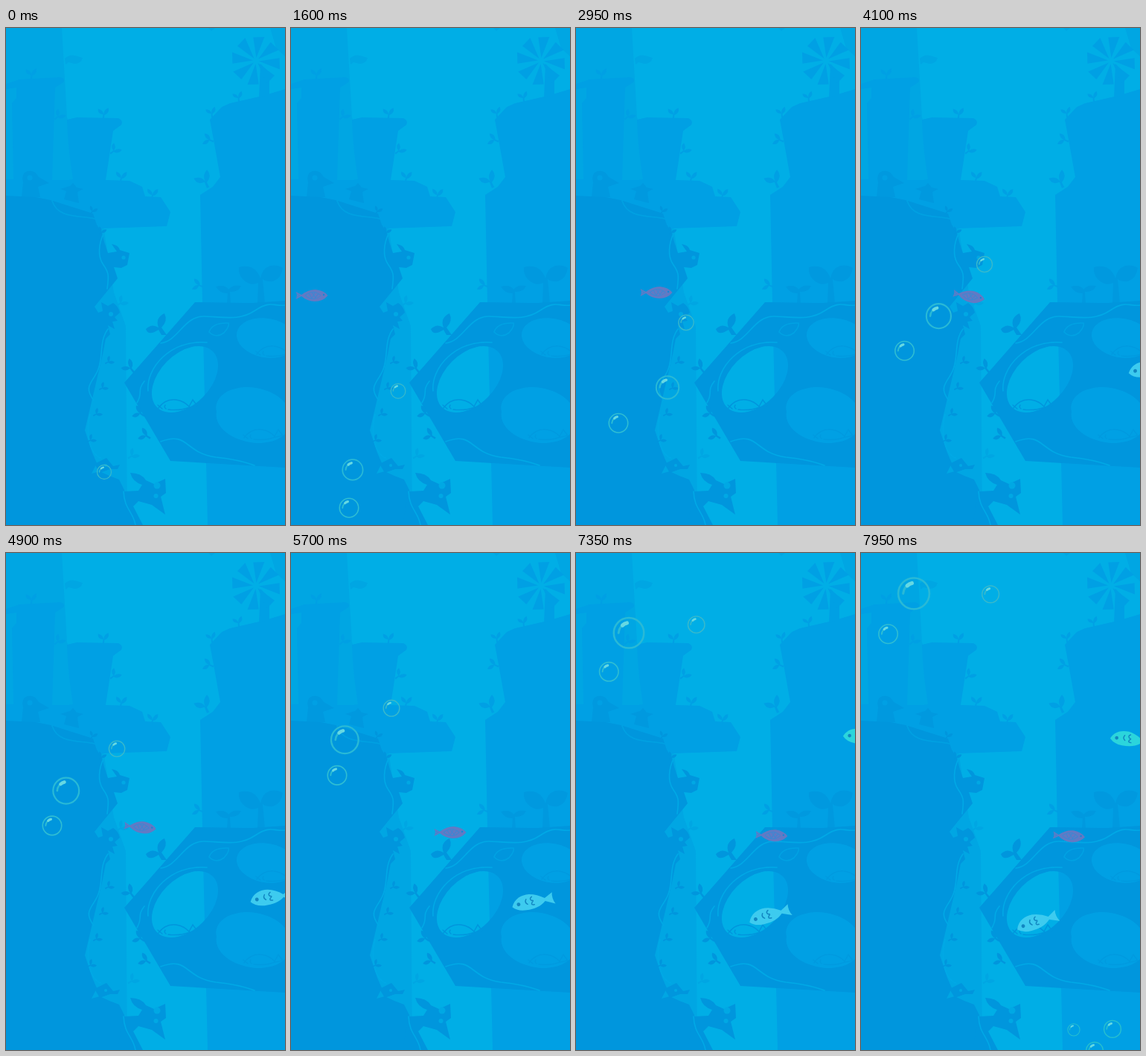
Recreate the animation shown at these times as an HTML page. Size 375 px wide and 667 px high, loop 8000 ms.

```html
<!DOCTYPE html>
<html lang="en">
<head>
<meta charset="utf-8">
<title>Underwater</title>
<style>
html, body { margin: 0; width: 100%; height: 100%; overflow: hidden; background: #00aee6; }
svg { display: block; width: 375px; height: 667px; }
.faint { fill: #00a6e3; }
.mid { fill: #00a0e4; }
.deep { fill: #0099df; }
.dark { fill: #0096dd; }
.water { fill: #00a8e4; }
.line { fill: none; stroke: #00a9e6; stroke-width: 1.6; stroke-linecap: round; }
.shade { fill: none; stroke: #0096dd; stroke-width: 1.5; stroke-linecap: round; }
.bubble { fill: none; stroke: currentColor; stroke-linecap: round; }
.glint { stroke: #66d8e2; }
</style>
</head>
<body>
<svg viewBox="0 0 375 667">
  <defs>
    <path id="sprout" d="M-1.2 1L-.8-5Q-8-5-8-12Q-1-11 0-5Q0-12 6-14Q8-7 1-4L1.2 1Z"/>
    <g id="bubble" class="bubble">
      <circle r="9.5" stroke-width="1.2"/>
      <path d="M-6.5 0Q-6.2-4.500-1.500-6.300" stroke-width="1.4"/>
      <path class="glint" d="M-4-4.800Q-2.800-6-1.200-6.300" stroke-width="2.400"/>
    </g>
    <g id="paleFish">
      <path d="M-23 3C-18-8-8-11 2-10Q13-8 22-1L33-7Q31 1 35 9L22 3C15 9 6 11-5 10.500Q-17 10-23 3Z"/>
      <g fill="none" stroke="#1287c2" stroke-width="1.5" stroke-linecap="round">
        <path d="M-3-4Q-6 0-2 3M5-6Q1-4 4-1Q8-1 4 2Q2 5 7 5"/>
        <circle cx="-14" cy="1" r="1.7" fill="#1287c2"/>
      </g>
    </g>
    <g id="pinkFish">
      <path fill="#627ac4" d="M-21.500-5L-14-1Q-5-8 5-8Q16-7 21.500 0Q15 8 4 8Q-6 8-14 1L-21.500 5Q-19 0-21.500-5Z"/>
      <path fill="none" stroke="#3d87d2" stroke-width="1" d="M-9 0Q2-9 12 0Q2 9-9 0M-4-3L0 4M0-4L6 4M4-4L0 4M9-3L4 4M-20-2L-16 0L-20 2"/>
      <circle cx="16" cy="-1" r="1.2" fill="#1588d5"/>
    </g>
  </defs>

  <rect width="375" height="667" fill="#00aee6"/>
  <path class="faint" d="M0 0H75L82 120L130 260L145 355L161 400L163 667H0ZM355 0H375V38L363 27Z"/>
  <path class="faint" d="M79 41Q85 35 93 37L103 40Q101 48 92 48L84 46L80 49ZM272 0H281L276 4Z"/>

  <g class="mid">
    <path d="M375 82L345 91L301 101L290 106L274 123L279 150L288 200L278 213L261 224L264 370L271 667H375Z"/>
    <path d="M0 75L18 69L73 66Q80 68 77 73L66 80L62 204H83L90 203Q83 160 82 123L95 120L151 121Q158 124 155 130L144 138L134 204L166 205L183 213L187 226L208 227L221 247L216 266L130 269L0 300V203H10L8 101L14 94V80L0 82Z"/>
    <path d="M342 48L354 60V91L340 94Z"/>
    <g id="mill" transform="translate(336 44)"></g>
  </g>

  <g class="deep">
    <path d="M338 370L339 342Q329 347 319 338Q312 331 313 321Q329 317 337 327Q341 332 342 336Q344 323 355 319Q365 317 372 322Q370 336 359 340Q350 341 345 337L348 370Z"/>
    <path d="M297 370L298 356Q288 357 282 347Q295 344 299 351Q305 344 316 346Q312 355 301 354L302 370Z"/>
    <path d="M21 227L23 207Q20 195 29 192Q39 190 44 200L58 208L43 213L46 227Z"/>
    <path d="M78 230L81 219L73 216L86 212L90 208L95 214L104 216L96 220L98 235Z"/>
  </g>
  <circle class="mid" cx="32" cy="201" r="3.500"/>

  <g class="dark">
    <path d="M0 225L40 227L60 231L117 249L122 264L129 275L132 287L137 302L149 300L142 290Q151 291 153 298L166 302L163 318L155 322L145 321L150 336L119 374L124 382L130 380L128 368L137 373L144 369Q151 373 153 382L146 388L150 393L143 394L146 404L137 399L140 411L134 417L130 438L106 540L116 570L122 584L115 598L126 595L139 601L152 606L159 620L161 638L174 667H0Z"/>
    <path d="M119 585L135 577L144 588L153 586L150 592L140 592L126 597Z"/>
    <path d="M158 622L178 621L183 613Q170 609 167 597Q182 597 188 607L199 612L214 605L215 624L208 629L214 653L196 640L178 635L171 642L184 667H150Z"/>
    <path fill-rule="evenodd" d="M254 368L330 369L375 366V590L221 581L159 476ZM203 509A53 34-45 1 1 278 434A53 34-45 1 1 203 509ZM310 414A40 26 10 1 1 390 418A40 26 10 1 1 310 414ZM283 515A50 32 10 1 1 381 524A50 32 10 1 1 283 515Z"/>
    <path d="M209 412L205 405Q191 414 188 404Q196 396 205 402Q200 389 213 383Q218 393 209 402L216 412Z"/>
  </g>

  <g class="water">
    <circle cx="158" cy="308" r="2.600"/>
    <circle cx="141" cy="384" r="3"/>
    <circle cx="203" cy="614" r="4.500"/>
    <circle cx="201.500" cy="628" r="3"/>
    <circle cx="134" cy="587" r="2"/>
  </g>

  <g class="line">
    <path d="M132 274C124 290 123 307 131 318S138 334 136 350"/>
    <path d="M137 404C125 420 131 440 124 458S103 480 118 500"/>
    <path d="M113 519C107 541 111 570 127 577"/>
    <path d="M158 622C159 646 171 649 174 667"/>
    <path d="M62 232C70 257 101 251 119 256" opacity=".6"/>
    <path d="M208 423C232 420 239 386 267 387S314 393 335 379S360 374 375 372"/>
    <path d="M176 503C185 488 175 488 186 474"/>
    <path d="M191 487C188 457 220 418 270 422"/>
    <path d="M208 555C246 541 239 570 282 576Q312 579 334 587"/>
    <path d="M273 408Q277 395 299 396Q301 400 293 409Q282 417 273 408Z" opacity=".65"/>
  </g>

  <g class="shade">
    <path id="sketch" d="M205 510Q214 497 229 499Q240 501 246 508L251 499L257 507L247 509Q233 514 218 512M214 506Q212 509 215 511M204 506L210 511"/>
    <use href="#sketch" x="132" y="-72" opacity=".55"/>
    <use href="#sketch" x="115" y="40" opacity=".55"/>
  </g>

  <g id="plants"></g>
  <g id="actors"></g>
</svg>
<script>
const LOOP = 8;
const NS = 'http://www.w3.org/2000/svg';
const byId = id => document.getElementById(id);

function add(parent, name, attrs) {
  const el = document.createElementNS(NS, name);
  for (const key in attrs) el.setAttribute(key, attrs[key]);
  return byId(parent).appendChild(el);
}

const place = (x, y, turn, size) => `translate(${x} ${y}) rotate(${turn}) scale(${size})`;

for (let i = 0; i < 8; i++) {
  add('mill', 'path', { d: 'M0-4L-7-31L8-33Z', transform: `rotate(${i * 45 + 6})` });
}

// Sprouts spaced evenly from one point to another
function sprouts(tone, count, [x1, y1], [x2, y2], turn, size = 1) {
  for (let i = 0; i < count; i++) {
    const u = count > 1 ? i / (count - 1) : 0;
    add('plants', 'use', {
      href: '#sprout', class: tone,
      transform: place(x1 + (x2 - x1) * u, y1 + (y2 - y1) * u, turn, size)
    });
  }
}
sprouts('faint', 2, [150, 372], [165, 577], 55);
sprouts('mid', 2, [34, 68], [131, 121], 3);
sprouts('mid', 2, [154, 206], [196, 229], 10);
sprouts('mid', 2, [66, 122], [141, 168], 50);
sprouts('mid', 2, [277, 119], [313, 98], -8, .9);
sprouts('mid', 1, [271, 213], [271, 213], -25, 1.5);
sprouts('mid', 2, [278, 152], [264, 347], -70);
sprouts('dark', 2, [114, 249], [126, 277], 32, .75);
sprouts('dark', 4, [134, 450], [110, 555], 60, .8);
sprouts('dark', 2, [185, 520], [193, 550], -60, 1.1);
sprouts('dark', 1, [171, 461], [171, 461], -40, 1.2);

// Smooth curve through unevenly spaced [time, ...values] keys
function curve(keys, t) {
  let i = 0;
  while (i < keys.length - 2 && t >= keys[i + 1][0]) i++;
  const a = keys[i], b = keys[i + 1];
  const before = keys[i - 1] || a, after = keys[i + 2] || b;
  const span = b[0] - a[0], u = (t - a[0]) / span, v = 1 - u;
  return a.slice(1).map((_, n) => {
    const k = n + 1;
    const leave = (b[k] - before[k]) / (b[0] - before[0]) * span;
    const arrive = (after[k] - a[k]) / (after[0] - a[0]) * span;
    return v * v * (1 + 2 * u) * a[k] + u * v * v * leave
      + u * u * (3 - 2 * u) * b[k] - u * u * v * arrive;
  });
}

const pinkSwim = [[0, -55, 346, 6], [1.6, 28, 359, 0], [2.95, 108, 355, 0],
  [4.1, 145, 360, 11], [5.7, 214, 375, 0], [8, 281, 380, 4]];
const smallSway = [[0, 132], [1.6, 144], [2.95, 148], [4.1, 166], [5.7, 135], [8, 175]];
const midSway = [[0, 84], [1.6, 78], [2.95, 57], [5.7, 62], [8, 36]];

// Each motion returns x, y, rotation, scale at t seconds
const actors = [
  ['pinkFish', '', t => [...curve(pinkSwim, t), 1]],
  ['paleFish', '#3dcbef', t => {
    const s = Math.max(t - 3.5, 0);
    return [406 - 39.3 * s, 456 + 2.2 * s + 1.5 * s * s, -4 - 3 * s, 1];
  }],
  ['paleFish', '#2bd5dc', t => [357 + 40 * (7.95 - t), 249 - 5 * (7.95 - t), 8, .95]],
  ['bubble', '#39b9cb', t => [...curve(smallSway, t), 596 - 68 * t, 0, 1 + t / 40]],
  ['bubble', '#29b9d6', t => {
    const s = t - 1.6;
    const drift = 54 * Math.exp(-(((t - 3.2) / 1.3) ** 2));
    return [71 + drift, 593 - 81 * s - .6 * s * s, 0, 1.44 + .12 * s];
  }],
  ['bubble', '#2fbdd3', t => [...curve(midSway, t), 779 - 84.3 * t, 0, 1.34]],
  ...[[286, 640, .85], [338, 639, 1.2], [314, 668, 1.2]].map(([x, y, size]) =>
    ['bubble', '#27bfcf', t => [x, y + 84 * (7.95 - t), 0, size]])
].map(([shape, color, motion]) =>
  ({ motion, el: add('actors', 'use', { href: '#' + shape, fill: color, color }) }));

function draw() {
  const t = performance.now() / 1000 % LOOP;
  for (const { el, motion } of actors) el.setAttribute('transform', place(...motion(t)));
  requestAnimationFrame(draw);
}
draw();
</script>
</body>
</html>
```
